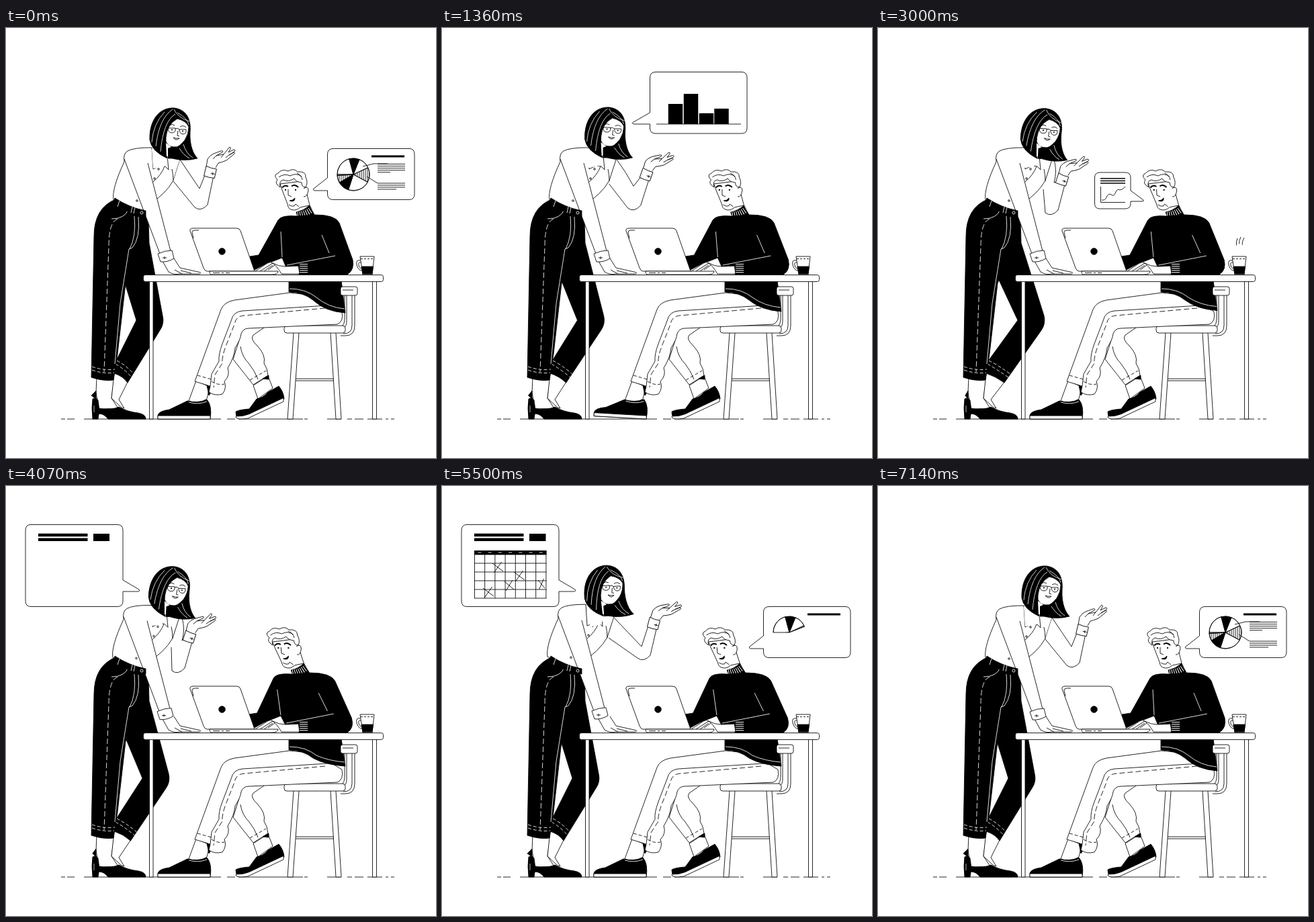
An HTML page that plays this animation: 640x640 px, repeating every 7210 ms.

```html
<!DOCTYPE html>
<html lang="en">
<head>
<meta charset="utf-8">
<title>Desk talk</title>
<style>
html, body { margin: 0; width: 100%; height: 100%; overflow: hidden; background: #fff; }
svg { display: block; width: 100vw; height: 100vh; fill: none; stroke: #000; stroke-width: .85; stroke-linejoin: round; }
.w { fill: #fff; }
.b { fill: #000; }
.l { fill: none; stroke: #fff; }
.n { stroke: none; }
.d { stroke-dasharray: 8 4; }
.s { stroke-dasharray: 5 3; }
</style>
</head>
<body>
<svg viewBox="0 0 640 640">
  <defs>
    <pattern id="hatch" width="3" height="3" patternUnits="userSpaceOnUse"><path d="M1 0V3"/></pattern>
    <clipPath id="pieClip"><path id="sector"/></clipPath>
  </defs>

  <path d="M82 582h6M91 582h11M116 582h204M329 582h12M346 582h96M444 582h5M478 582h21M508 582h7M519 582h13M538 582h22M565 582h4M573 582h5"/>

  <g id="woman">
    <path class="w" d="M135 520L134 542 138 567 167 566 157 551 161 522"/>
    <path id="shin" class="w"/>
    <path id="heelBack" class="b"/>
    <path class="b" d="M129 552Q134 549 137 554L139 569 137 582H129Q127 565 129 552Z"/>
    <path class="l" stroke-width=".7" d="M131 562V572"/>
    <path class="b" d="M138 566Q155 570 168 564Q180 571 197 573Q208 575 208 582H152Q146 574 138 574Z"/>
    <path id="leg" class="b"/>
    <path id="legCuff" class="l s"/>
    <path class="b" d="M163 255Q131 268 131 310L127 520Q145 526 160 524L166 485 178 380 200 325 212 290 207 274Z"/>
    <g class="l">
      <path d="M183 329L170 410 162 500M197 281Q200 313 188 327L183 329M191 280Q194 310 184 329M157 284Q177 284 182 270"/>
      <path class="d" d="M166 284Q153 289 153 325L146 512"/>
      <path class="s" d="M128 504Q145 510 162 508M128 509Q145 515 161 513"/>
    </g>
    <g id="torso">
      <path class="w" d="M216 178Q190 178 181 183Q174 187 176 199Q157 240 160 256L207 275 210 265Q238 247 249 227L259 196Q248 190 240 192Z"/>
      <path d="M249 228Q249 218 247 210"/>
      <path class="w" d="M217 178L219 210 229 205 237 206 242 211 240 190"/>
      <path d="M236 206Q231 219 219 229"/>
      <circle class="w" cx="227" cy="210" r="1.3"/><circle class="w" cx="221" cy="224" r="1.3"/><circle class="w" cx="195" cy="257" r="1.3"/>
    </g>
    <path class="w" d="M233 347L242 363Q250 368 258 366H288Q292 364 286 363L259 357 250 343M251 360L262 366M260 361L276 365"/>
    <g id="leanArm">
      <path class="w n" d="M177 198L229 336 245 332 211 201 195 182Z"/>
      <path d="M176 195L229 336M245 332L211 201"/>
      <path class="w" d="M226 336Q237 331 247 331L250 343Q240 349 230 348Z"/>
      <path d="M233 342h6M236 340v4"/>
    </g>
    <path class="b" d="M162 253Q183 267 208 272V280Q180 275 159 262Z"/>
    <path class="l" d="M169 257L166 266M188 266L186 275M192 267L190 276"/>
    <circle class="l" cx="202" cy="275" r="2"/>

    <path id="sleeve" class="w"/>
    <g id="hand"><path class="w" d="M-6-8L-4-20Q-1-25 5-28L16-32Q20-33 18-30L9-25 20-27 28-37Q31-39 30-35L27-30 35-34Q38-34 36-31L28-26 35-30Q38-29 35-27L24-18Q17-15 12-14L8-7M9-25L4-20M20-27L16-22M28-26L23-22"/></g>
    <g id="cuff"><path class="w" d="M-8-8Q0-6 8-7V7Q0 8-8 7Z"/><path d="M1 1h6M4-1v4"/></g>

    <g id="head">
      <path class="b" d="M214 166C213 139 227 118 250 119C267 121 276 134 274 155C273 175 279 188 285 194Q266 199 247 194L240 194Q218 182 214 166Z"/>
      <path class="w n" d="M236 176L241 193 236 206 219 209 217 180Z"/>
      <path class="b" d="M214 166Q216 183 240 194L238 165 225 150Z"/>
      <path class="w" d="M238 163Q240 143 255 135Q268 138 272 147Q272 158 266 167Q257 178 252 177Q242 178 238 169Z"/>
      <path class="w n" d="M238 171L246 177 241 179 241 191 239 191Z"/>
      <path class="l" stroke-width=".8" d="M250 121Q256 134 273 139M248 121Q228 134 223 176M252 128Q234 139 230 184M236 125Q219 143 217 170M255 126Q270 134 272 144M258 179Q264 189 273 194M264 173Q268 187 278 193"/>
      <path d="M243 145Q247 142 251 145M259 147Q264 144 268 148"/>
      <path d="M241 149H252Q253 156 247 156Q241 156 241 149ZM258 151H268Q269 158 263 158Q258 157 258 151ZM252 150Q255 148 258 151M256 153L255 160 258 161"/>
      <path stroke-width="1.6" d="M246 151.500h2M262 153.500h2"/>
      <path d="M249 163Q253 165 258 164Q253 169 249 163Z"/>
    </g>
  </g>

  <g id="chair" class="w">
    <path d="M428 454L419 582H427L436 454M483 454L491 582H499L491 454M431 522H488M431 525H488"/>
    <path fill="none" d="M504 397V432Q504 443 498 445M515 397V443Q515 455 502 455M519 397V443Q519 458 505 458H498M507 397V436Q507 444 503 446"/>
    <rect x="414" y="443" width="91" height="11" rx="4"/>
  </g>

  <g id="man">
    <path class="w" d="M347 465L338 493 368 531 390 517Q389 506 384 499Q387 487 374 473Q363 463 368 457L384 446M349 474Q351 489 362 500Q370 510 375 523"/>
    <path class="s" d="M363 524L387 510"/>
    <path class="w" d="M368 532L375 552 397 536 390 518Z"/>
    <path class="b" d="M382 522L391 517 391 523Z"/>
    <path class="b" d="M342 571Q347 568 362 567L373 552Q382 551 390 542L406 533Q413 541 414 552L358 581Q341 584 342 571Z"/>
    <path class="w" d="M342 578Q354 578 362 574.500L413 550.500V556L360 581Q341 584 342 578Z"/>
    <path class="w" d="M283 525L272 555Q286 562 299 552L303 534Z"/>
    <path class="b" d="M299 532L309 537 302 547Z"/>
    <g id="shoe">
      <path class="b" d="M226 576Q228 570 243 568L270 555Q285 559 299 553Q307 562 304 582H226Z"/>
      <path class="w" d="M226 577H304V582H226Z"/>
      <path class="l" d="M272 557Q286 561 299 556"/>
    </g>
    <path class="w" d="M422 394L340 405Q324 408 320 419L281 526 304 533 302 542Q311 548 322 545Q329 536 325 526Q334 517 330 506Q340 490 341 476Q349 464 350 455Q353 447 361 447L493 441Q503 437 500 422L460 398Z"/>
    <path d="M478 413L352 421Q338 422 335 436L322 470Q316 486 317 496L306 515 304 533"/>
    <path class="d" d="M475 417L354 428Q342 429 340 441L327 474Q321 490 322 499L311 516 309 535"/>
    <path class="s" d="M285 517L306 523M306 526Q315 532 325 530"/>
    <path id="hem" class="b"/>
    <path id="hemLine" class="l"/>
    <g class="w"><rect x="498" y="385" width="25" height="13" rx="3"/><path d="M501 390H517"/></g>
    <g id="bust">
      <path class="w n" d="M424 268L433 278 450 266 441 240Z"/>
      <path class="w" d="M408 232L411 241 419 262Q420 269 424 270Q431 273 438 267L442 266 452 264 446 239 440 228Z"/>
      <path class="b" d="M432 274Q443 272 452 264L460 280 435 284Z"/>
      <path class="l" stroke-width="9" stroke-dasharray="1 2.2" d="M434 278Q446 277 455 270"/>
      <path class="b" d="M405 286Q410 278 433 280L460 278Q490 278 496 290L516 345Q519 360 508 367H437L416 354 411 342 385 352 368 361 363 340 376 338Z"/>
      <path class="l" d="M409 303L411 341M470 308L481 335M490 339L418 353"/>
      <path class="w" d="M408 237Q399 231 404 226Q397 219 405 216Q411 209 420 213Q428 208 434 214Q447 213 446 222Q450 230 446 237Q440 237 440 230Q431 229 429 224Q420 230 413 226Q406 227 408 237Z"/>
      <path d="M406 222Q414 216 423 220Q432 215 440 221M433 216Q440 219 441 226"/>
      <path class="w" d="M443 239Q450 234 450 242Q448 252 443 251"/>
      <path stroke-width="2" d="M411 237.500Q415 233 420 236M425 235.500Q430 232 435 237"/>
      <path d="M420 240L420 249 425 251M421 263Q425 266 429 265L431 262 436 266"/>
      <path stroke-width="2" d="M415 241h2M430 241h2"/>
      <path class="b" d="M422 257Q427 257 430 253Q430 260 422 257Z"/>
    </g>
    <path class="w" d="M371 362L389 350Q394 347 397 350Q406 355 416 355L437 354V366H410Q403 354 397 350L378 362M390 360L400 353M384 362L397 353"/>
    <path class="b" d="M435 352L451 349V366H437Z"/>
    <path class="l" stroke-width="12" stroke-dasharray="1 2" d="M443 351V366"/>
  </g>

  <g id="desk" class="w">
    <path d="M279 298H343Q348 298 349 302L370 362H299Q296 362 294 357L274 302Q273 298 279 298Z"/>
    <path d="M279 313L277 304Q277 301 281 301H287"/>
    <circle class="b" cx="321.5" cy="332.5" r="4.8"/>
    <path d="M303 362H405Q405 367 395 367H306Q303 367 303 362Z"/>
    <path d="M308 364.5h10M321 364.5h3M327 364.5h6"/>
    <path d="M213.500 377V582H219V377M545.500 377V582H551.500V377"/>
    <rect x="204.500" y="367.500" width="357" height="10" rx="3"/>
    <path d="M528 346Q520 344 522 353Q525 362 531 361M528 349Q524 348 525 353Q526 358 530 358"/>
    <path d="M527 340H548L545 367H531Z"/>
    <path class="b" d="M529 355H546.500L545 366H531Z"/>
    <path stroke-dasharray="3 2" d="M528 343.500H548"/>
    <g id="steam" fill="none">
      <path pathLength="1" d="M536 338Q540 333 536 328Q531 323 535 313"/>
      <path pathLength="1" d="M540 336Q544 331 540 326Q535 321 540 311"/>
      <path pathLength="1" d="M542 338Q548 332 544 326Q540 321 545 312"/>
    </g>
  </g>

  <g id="pieBubble">
    <path class="w" d="M487 179.500H600Q608 179.500 608 188V247Q608 255.500 600 255.500H487Q478.500 255.500 478.500 247V242H459Q456 241 458 239L478.500 223V188Q478.500 179.500 487 179.500Z"/>
    <path data-draw="4800 5050" stroke-width="3" d="M544 191H593"/>
    <g id="pie" clip-path="url(#pieClip)"></g>
    <path id="pieEdge"/>
    <path data-draw="5950 6290" d="M531 206L547 202H568"/>
    <path data-draw="5950 6290" d="M537 221L553 231"/>
    <g id="textLines"></g>
  </g>

  <g id="barBubble">
    <path class="w" d="M318 65.500H446Q454 65.500 454 74V149Q454 157 446 157H318Q309.500 157 309.500 149V143H286Q281 142 285 140L309.500 126V74Q309.500 65.500 318 65.500Z"/>
    <path data-draw="800 1050" d="M319 143H445"/>
    <g stroke-width="21.500">
      <path data-draw="900 1250" d="M347.500 143V113"/><path data-draw="1000 1350" d="M370.500 143V98"/>
      <path data-draw="1100 1450" d="M393.500 143V121"/><path data-draw="1200 1560" d="M416 143V90"/>
    </g>
  </g>

  <g id="chartBubble">
    <path class="w" d="M330 215H368Q376 215 376 223V242L395 256Q396 258 393 258H376V261Q376 269 368 269H330Q322.500 269 322.500 261V223Q322.500 215 330 215Z"/>
    <g stroke-width="1.300"><path data-draw="2100 2300" d="M331 224H368"/><path data-draw="2180 2380" d="M331 227.500H368"/><path data-draw="2260 2460" d="M331 231H368"/></g>
    <path data-draw="2350 2650" d="M331.500 236V259.500H368"/>
    <path data-draw="2550 2950" d="M333 256Q338 257 340 252Q343 245 347 248Q351 252 354 244Q356 239 360 241Q364 241 368 236"/>
  </g>

  <g id="planBubble">
    <path class="w" d="M37 57.500H166Q174 57.500 174 66V140L198 154Q200 157 196 157H174V171Q174 179.500 166 179.500H37Q29 179.500 29 171V66Q29 57.500 37 57.500Z"/>
    <path data-draw="3700 3950" stroke-width="4.500" d="M48 73H121.500"/><path data-draw="3780 4030" stroke-width="4.500" d="M48 79.700H121.500"/>
    <path data-draw="3840 4074" stroke-width="11" d="M130 76.500H154.500"/>
    <g id="grid"></g>
    <path data-draw="4100 4350" stroke-width="6" d="M48 99H155.500"/>
    <g id="dashes" class="l"></g>
    <g id="crosses"></g>
  </g>
</svg>

<script>
const LOOP = 7210, STEP = LOOP / 101;
const $ = id => document.getElementById(id);
const set = (id, d) => $(id).setAttribute('d', d);
const move = (id, value) => $(id).setAttribute('transform', value);
const ramp = (t, a, b) => Math.min(1, Math.max(0, (t - a) / (b - a)));
const ease = p => p * p * (3 - 2 * p);
const drawn = (d, a, b) => `<path data-draw="${a} ${b}" d="${d}"/>`;

const onPie = (deg, r = 24) => {
  const a = deg * Math.PI / 180;
  return `${517 + r * Math.cos(a)} ${218 + r * Math.sin(a)}`;
};
const wedge = (from, to, r = 24) =>
  `M517 218L${onPie(from, r)}A${r} ${r} 0 ${to - from > 180 ? 1 : 0} 1 ${onPie(to, r)}Z`;

$('pie').innerHTML = [[-105, -68, '#000'], [-68, -25, 'none'], [-25, 28, 'url(#hatch)'],
  [28, 108, 'none'], [108, 150, '#000'], [150, 176, 'url(#hatch)'], [176, 255, 'none']]
  .map(([a, b, fill]) => `<path fill="${fill}" d="${wedge(a, b)}"/>`).join('');

$('textLines').innerHTML = [202.5, 205.5, 208.5, 211.5, 214.5, 231, 234, 237, 240].map((y, i) =>
  drawn(`M553 ${y}H${{ 4: 572, 8: 581 }[i] || 594}`, 6290 + i * 80, 6480 + i * 80)).join('');

let grid = '', dashes = '';
for (let i = 0; i < 8; i++) {
  const x = 48.5 + i * 15.2;
  grid += drawn(`M${x} 96V167`, 4200 + i * 40, 4420 + i * 40);
  if (i < 6) grid += drawn(`M48 ${102 + i * 13}H155.500`, 4200 + i * 50, 4450 + i * 50);
  if (i < 7) dashes += drawn(`M${x + 5} 99h5`, 4300, 4500);
}
$('grid').innerHTML = grid;
$('dashes').innerHTML = dashes;
$('crosses').innerHTML = [[83, 121, 8], [115, 134, 8], [100, 148, 7], [69, 158, 8], [148, 146, 5]].map(([x, y, r], i) =>
  drawn(`M${x - r} ${y - 6}L${x + r} ${y + 6}`, 4790 + i * 120, 4880 + i * 120) +
  drawn(`M${x + r * .7} ${y - 8}L${x - r * .7} ${y + 8}`, 4860 + i * 120, 4960 + i * 120)).join('');

const strokes = [...document.querySelectorAll('[data-draw]')].map(el => {
  el.setAttribute('pathLength', 1);
  const [a, b] = el.dataset.draw.split(' ').map(Number);
  return { el, a, b, wraps: $('pieBubble').contains(el) };
});

// id, tail tip x and y, entry start and end, exit start and end
const bubbles = [
  ['barBubble', 284, 142, 420, 720, 2240, 2520],
  ['chartBubble', 395, 257, 1700, 1980, 3280, 3560],
  ['planBubble', 199, 156, 3380, 3680, 6500, 6800],
  ['pieBubble', 457, 241, 4580, 4860, LOOP + 1050, LOOP + 1350]
];

// shoulder x, sleeve bow, inner elbow, underarm, elbow, cuff, cuff angle, hand angle,
// head x, y, angle, torso sway, knee, lean of the seated body
const rest = [259, 0, 288, 239, 249, 228, 290, 274, 304, 215, 13, 0, 0, 0, 0, 0, 0, 0];
const poses = [
  [0, rest],
  [790, [259, 0, 300, 238, 249, 229, 301, 271, 319, 214, 19, 14, -1, -1, 0, 0, 3, -.15]],
  [2070, [262, 5, 264, 232, 248, 236, 264, 281, 283, 225, 20, -1, -2, -1, 0, 0, 14, -.5]],
  [3000, [262, 5, 262, 230, 246, 240, 258, 282, 274, 226, 18, 5, -3, 0, 3, 0, 14, -.5]],
  [4070, [262, 5, 262, 230, 246, 240, 256, 282, 273, 225, 18, 5, -3, 0, 3, -1, 9, -1]],
  [5500, [256, 0, 297, 239, 248, 226, 300, 263, 315, 205, 15, 9, 0, 0, -4, -3, 0, -1]],
  [7140, rest], [LOOP, rest]
];
const poseAt = t => {
  const i = poses.findIndex(([time]) => time > t);
  const [a, from] = poses[i - 1], [b, to] = poses[i];
  const p = ease(ramp(t, a, b));
  return from.map((v, j) => v + (to[j] - v) * p);
};
const taps = [[430, 1150], [1250, 1560], [3250, 3900], [4850, 5450]];

function drawWoman([sx, bow, ix, iy, lx, ly, ex, ey, cx, cy, cuffA, handA, hx, hy, headA, sway, k]) {
  const a = cuffA * Math.PI / 180, c = Math.cos(a), s = Math.sin(a);
  const cuffPoint = x => `${cx + x * c - 6 * s} ${cy + x * s + 6 * c}`;
  set('sleeve', `M${sx} 196Q${(sx + ix) / 2 + bow} ${(196 + iy) / 2} ${ix} ${iy}L${cuffPoint(-7)} ${cuffPoint(6)}` +
    `L${ex + 10} ${ey - 11}Q${ex} ${ey} ${ex - 9} ${ey - 7}L${lx} ${ly}`);
  move('cuff', `translate(${cx} ${cy}) rotate(${cuffA})`);
  move('hand', `translate(${cx} ${cy}) rotate(${handA})`);
  move('head', `translate(${hx} ${hy}) rotate(${headA} 235 190)`);
  move('torso', `translate(${sway} ${sway * .6})`);
  move('leanArm', `translate(${sway} ${sway * .4})`);
  const hem = 181 + k * .5;
  set('leg', `M212 285L213 320 ${233 + k} 428Q${236 + k} 440 ${229 + k} 450L${hem} 528Q174 518 161 514L163 497 ${194 + k} 435 177 ${380 - k * .8} 190 320Z`);
  set('legCuff', `M165 495Q179 502 ${190 + k * .5} 515M163 500Q177 508 ${187 + k * .5} 520`);
  set('shin', `M161 514L157 551 172 565 176 566 168 553 ${hem} 527`);
  set('heelBack', `M${127 + k * .2} 547L134 540 134 552Z`);
}

function drawMan(lean, t) {
  const skew = Math.atan(-lean * 8 / 93) * 180 / Math.PI;
  move('bust', `translate(0 365) skewX(${skew}) translate(0 -365)`);
  const y = 424 + 7 * lean;
  set('hem', `M421 376V393Q442 393 457 405Q475 ${y - 2} 505 ${y}L499 376Z`);
  set('hemLine', `M422 388Q446 388 462 401Q480 ${y - 8} 504 ${y - 6}`);
  const tap = taps.reduce((sum, [a, b]) => sum + Math.sin(Math.PI * ramp(t, a, b)) ** 2, 0);
  move('shoe', `rotate(${4.2 * tap} 304 582)`);
}

function render(t) {
  const wrapped = t < 1600 ? t + LOOP : t;
  const pose = poseAt(t);
  drawWoman(pose);
  drawMan(pose[17], t);
  for (const [id, x, y, in0, in1, out0, out1] of bubbles) {
    const u = id === 'pieBubble' ? wrapped : t;
    const size = ease(ramp(u, in0, in1)) * (1 - ease(ramp(u, out0, out1)));
    $(id).style.visibility = size > .01 ? 'visible' : 'hidden';
    move(id, `translate(${x} ${y}) scale(${size}) translate(${-x} ${-y})`);
  }
  for (const { el, a, b, wraps } of strokes) {
    const p = ramp(wraps ? wrapped : t, a, b);
    el.style.display = p ? '' : 'none';
    el.style.strokeDasharray = p < 1 ? `${p} 2` : 'none';
  }
  const sweep = Math.min(359.9, 360 * ramp(wrapped, 5050, 6060));
  set('sector', wedge(180, 180 + sweep, 26));
  set('pieEdge', sweep ? wedge(180, 180 + sweep) : '');
  const head = ramp(t, 1640, 2220), tail = ramp(t, 2400, 3400);
  $('steam').style.display = head > tail ? '' : 'none';
  $('steam').style.strokeDasharray = `0 ${tail} ${head - tail} 2`;
}

const start = performance.now();
function tick() {
  const t = (performance.now() - start) % LOOP;
  render(Math.floor(t / STEP) * STEP);
  requestAnimationFrame(tick);
}
tick();
</script>
</body>
</html>
```
